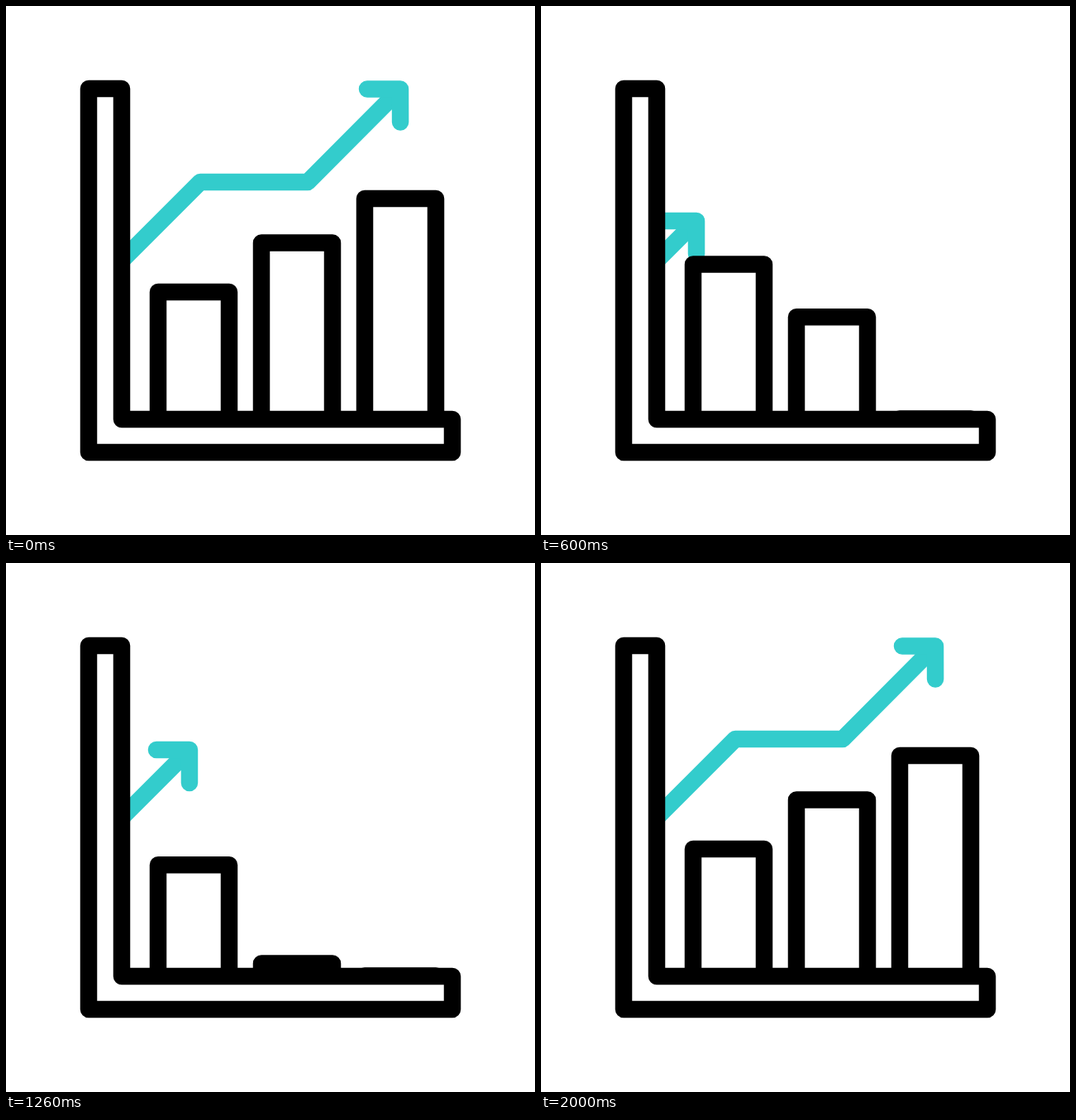
These frames come from a looping animation (640x640 px, 2220 ms). An HTML page:

```html
<!DOCTYPE html>
<html lang="en">
<head>
<meta charset="utf-8">
<title>Growth chart</title>
<style>
  html, body { margin: 0; width: 100%; height: 100%; overflow: hidden; background: #fff; }
  svg { display: block; width: 100%; height: 100%; }
  path { fill: none; stroke: #000; stroke-width: 20.5; stroke-linejoin: round; }
  .trend path { stroke: #3cc; }
  #head { stroke-linecap: round; }
</style>
</head>
<body>
<svg viewBox="0 0 640 640">
  <clipPath id="plot"><rect x="150" y="0" width="490" height="335"/></clipPath>
  <g class="trend" clip-path="url(#plot)">
    <path id="line"/>
    <path id="head"/>
  </g>
  <g id="bars"><path/><path/><path/></g>
  <path d="M100 100H140V500H540V540H100Z"/>
</svg>
<script>
const LOOP = 2220, STEP = 20, MIDDLE = 1000, END = 2000;
const BASE = 499.5, OVERSHOOT = 33.5;

const line = document.getElementById('line');
const head = document.getElementById('head');
const barPaths = document.querySelectorAll('#bars path');

const bars = [
  { left: 184, right: 270, top: 346, start: 0 },
  { left: 309, right: 395, top: 286.5, start: 200 },
  { left: 434, right: 520, top: 233, start: 400 }
];

// Distance along the trend is 0 where it leaves the axis.
const corners = [[150, 298], [235, 213], [365, 213], [477, 100.5]];
const segments = corners.slice(1).map(([x, y], i) => {
  const [x0, y0] = corners[i];
  const length = Math.hypot(x - x0, y - y0);
  return { x0, y0, length, dx: (x - x0) / length, dy: (y - y0) / length };
});
const FULL = segments.reduce((sum, s) => sum + s.length, 0);
const HIDDEN = -21, STRETCHED = FULL + 18, GROW = 755;

const mix = (a, b, k) => a + (b - a) * k;

function ease(time, start, duration) {
  const u = Math.min(1, Math.max(0, (time - start) / duration));
  return u * u * (3 - 2 * u);
}

// Rise past the full height in 400 ms, then settle in 200 ms.
function barTop({ top, start }, time) {
  const rise = (BASE - top + OVERSHOOT) * ease(time, start, 400);
  return BASE - rise + OVERSHOOT * ease(time, start + 400, 200);
}

function trendLength(t) {
  if (t < MIDDLE) return FULL - 0.592 * t;
  const peak = MIDDLE + GROW;
  const grown = mix(HIDDEN, STRETCHED, ease(t, MIDDLE, GROW));
  return grown - (STRETCHED - FULL) * ease(t, peak, END - peak);
}

function drawTrend(distance) {
  let d = 'M80 368', rest = distance, i = 0;
  while (i < segments.length - 1 && rest > segments[i].length) {
    rest -= segments[i++].length;
    d += `L${corners[i]}`;
  }
  const { x0, y0, dx, dy } = segments[i];
  const x = x0 + dx * rest, y = y0 + dy * rest;
  const visible = distance > -15;
  line.setAttribute('d', visible ? `${d}L${x} ${y}` : '');

  const angle = Math.atan2(dy, dx);
  const arm = side => {
    const a = angle + side * Math.PI * 0.75;
    return `${x + 40 * Math.cos(a)} ${y + 40 * Math.sin(a)}`;
  };
  head.setAttribute('d', visible ? `M${arm(-1)}L${x} ${y}L${arm(1)}` : '');
}

function draw(t) {
  const growth = Math.abs(t - MIDDLE);
  bars.forEach((bar, i) => {
    barPaths[i].setAttribute('d', `M${bar.left} 500V${barTop(bar, growth)}H${bar.right}V500`);
  });
  drawTrend(trendLength(t));
}

const origin = performance.now();
function tick() {
  const elapsed = (performance.now() - origin) % LOOP;
  draw(Math.min(END, Math.floor(elapsed / STEP) * STEP));
  requestAnimationFrame(tick);
}
tick();
</script>
</body>
</html>
```
